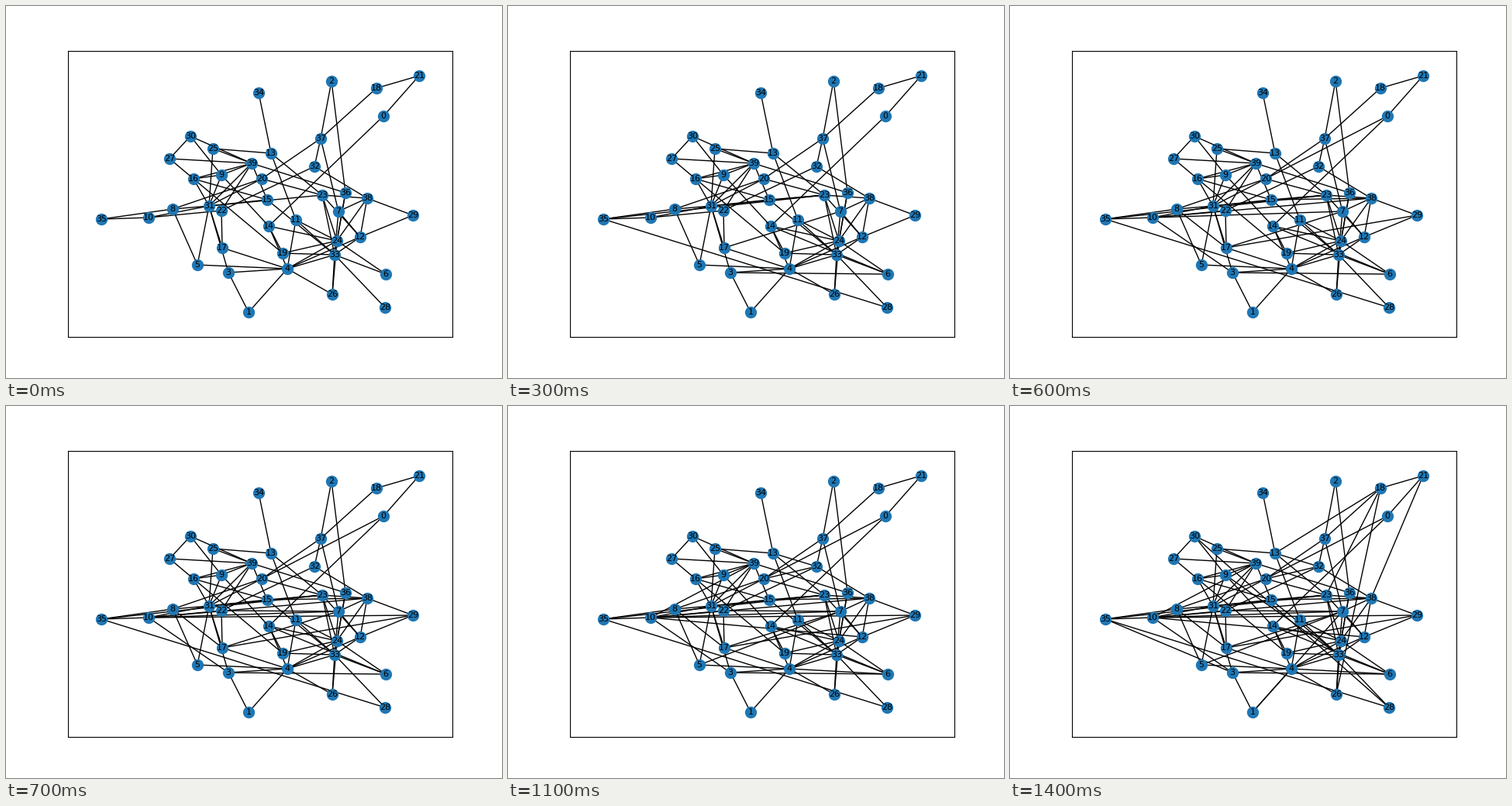
Write a matplotlib script that moves like this. It is 640 by 480 pixels and loops after 1430 ms.

```python
import math
from itertools import pairwise

import matplotlib.pyplot as plt
from matplotlib.animation import FuncAnimation
from matplotlib.collections import LineCollection

STEP_MS, TICK_MS, LOOP_MS = 100, 10, 1430
STEPS = math.ceil(LOOP_MS / STEP_MS)

# node centres in stage pixels, y downwards
NODES = [
    (487, 142), (313, 395), (420, 97), (287, 344), (363, 339), (247, 334),
    (490, 346), (429, 265), (215, 262), (278, 218), (184, 273), (374, 276),
    (457, 298), (342, 190), (339, 284), (337, 250), (242, 223), (279, 312),
    (478, 106), (357, 319), (330, 223), (533, 90), (278, 264), (408, 244),
    (427, 303), (267, 184), (421, 372), (211, 197), (489, 389), (525, 270),
    (238, 168), (262, 258), (398, 207), (424, 321), (326, 112), (123, 275),
    (438, 241), (406, 171), (466, 248), (317, 203),
]

# a hub links to every node whose distance lies in the ring
HUBS = 4, 24, 31, 33, 38, 39
RING = 40, 79.5

# walks along the other links present from the start
WALKS = [
    "34 13 23 20 8 35 10 22 17 4 12 7 37 2 36 39 30 27 39",
    "30 9 14 0 21 18 37 32 22",
    "28 33 15 16 19 14 24",
    "29 12 23 31 3 1",
    "8 5 4",
    "25 13 11",
    "27 16 9",
    "20 37",
    "33 36",
]

# (first step, walk): each walk gains one link per step
GROWTH = [
    (1, "28 35 23 15 38 10 7 22"),
    (1, "3 6 14"),
    (3, "7 17 29"),
    (4, "0 20"),
    (5, "8 17"),
    (6, "3 10 29"),
    (8, "13 32 20"),
    (9, "6 4"),
    (10, "12 10 39"),
    (11, "5 7"),
    (12, "26 18"),
    (12, "38 21"),
    (13, "13 18 23"),
    (13, "7 1"),
    (13, "9 33"),
    (13, "35 3"),
    (14, "30 28"),
]


def links(walk):
    return [tuple(sorted(pair)) for pair in pairwise(map(int, walk.split()))]


def hub_links(hub):
    near, far = RING
    return [tuple(sorted((hub, i))) for i, p in enumerate(NODES)
            if near < math.dist(NODES[hub], p) < far]


def graph_at(step):
    graph = {e for hub in HUBS for e in hub_links(hub)}
    for walk in WALKS:
        graph.update(links(walk))
    for first, walk in GROWTH:
        graph.update(links(walk)[:max(0, step - first + 1)])
    return [(NODES[a], NODES[b]) for a, b in sorted(graph)]


segments = [graph_at(step) for step in range(STEPS)]

fig = plt.figure(figsize=(6.4, 4.8), dpi=100, facecolor="white")
ax = fig.add_axes([0.125, 0.11, 0.775, 0.77])
ax.set(xlim=(80, 576), ylim=(427.2, 57.6), xticks=[], yticks=[])

edges = LineCollection(segments[0], colors="black", linewidths=1, zorder=1)
ax.add_collection(edges, autolim=False)
ax.scatter(*zip(*NODES), s=100, linewidths=1, c="#1f77b4", zorder=2)
for i, (x, y) in enumerate(NODES):
    ax.text(x, y, str(i), size=8, family="DejaVu Sans",
            ha="center", va="center", zorder=3)


def update(tick):
    edges.set_segments(segments[tick * TICK_MS // STEP_MS])
    return edges,


anim = FuncAnimation(fig, update, frames=LOOP_MS // TICK_MS, interval=TICK_MS,
                     repeat=True, repeat_delay=0)
plt.show()
```
